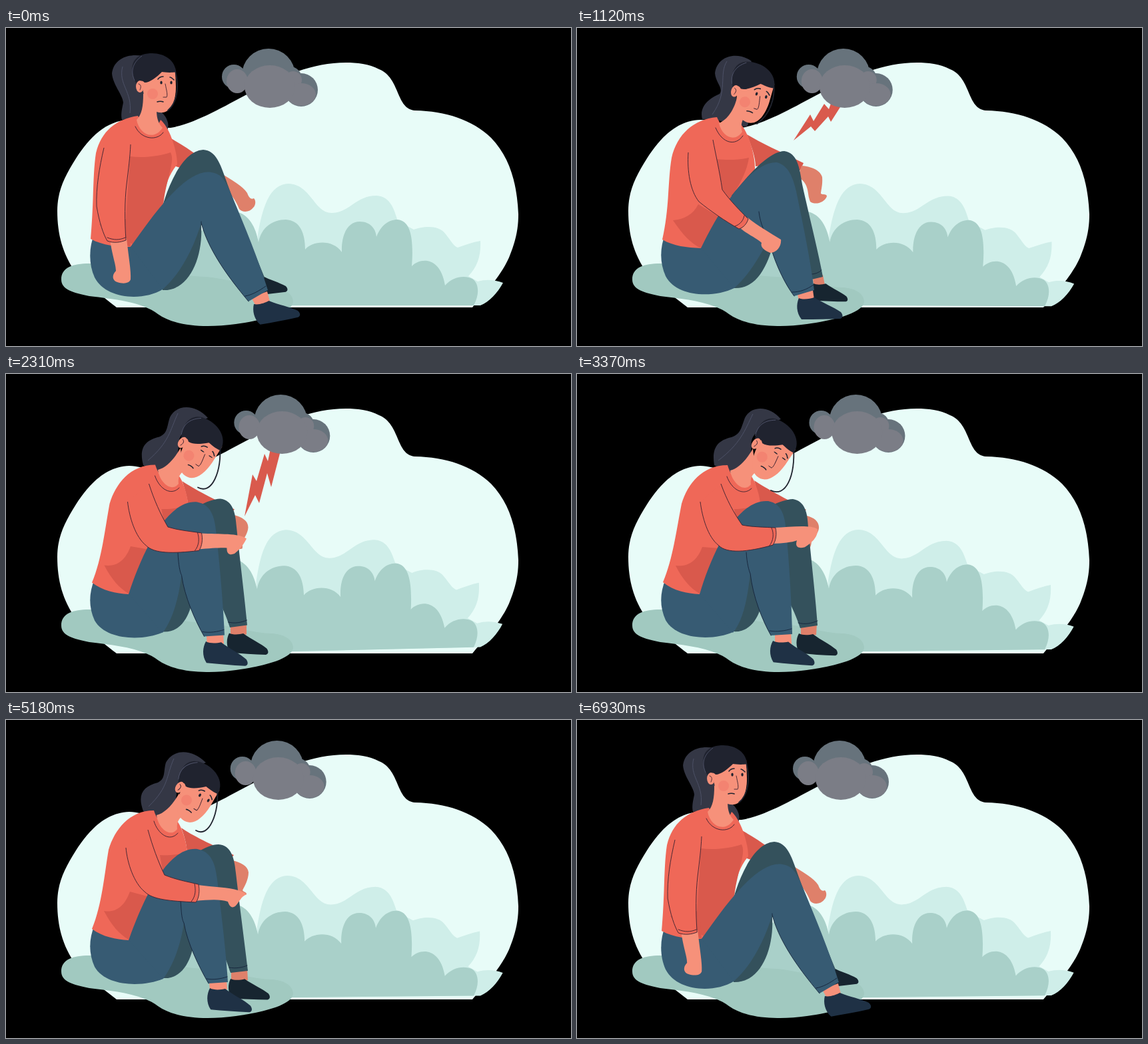
Recreate the animation shown at these times as an HTML page. Size 848 by 478 pixels, loop 6.96 s.

```html
<!DOCTYPE html>
<html lang="en">
<head>
<meta charset="utf-8">
<title>Under the cloud</title>
<style>
html, body { margin: 0; width: 100%; height: 100%; overflow: hidden; background: #000; }
svg { display: block; width: 100vw; height: 100vh; }
.line { fill: none; stroke: #3a2230; stroke-width: .9; stroke-linecap: round; }
.fold { fill: none; stroke: #16243a; stroke-width: .9; stroke-linecap: round; }
.strand { fill: none; stroke: #20242f; stroke-width: 1.8; stroke-linecap: round; }
.wisp { fill: none; stroke: #50546a; stroke-width: .9; }
.skin { fill: #f6917a; }
.skin-dark { fill: #df806a; }
.knit { fill: #ef6858; }
.knit-dark { fill: #d9594c; }
.jeans { fill: #375b73; }
.jeans-dark { fill: #34515c; }
.hair { fill: #20232f; }
</style>
</head>
<body>
<svg viewBox="0 0 848 478">
  <path fill="#e8fcf8" d="M166 420L700 420C716 400 740 378 755 345C766 318 769 300 769 280C767 235 757 195 728 165C700 138 660 125 614 124C585 122 592 75 560 62C545 54 527 52 510 52C460 52 415 72 365 98C325 119 283 144 247 150C225 150 210 139 185 138C150 139 125 165 105 196C88 223 77 245 77 275C77 310 85 340 105 368C122 385 140 400 166 420Z"/>
  <g id="bush">
    <path fill="#cfeee9" d="M378 310C385 270 395 235 424 234C458 235 462 278 489 278C515 278 525 252 556 252C578 253 583 275 588 290L612 303C625 298 650 295 660 310C668 320 672 328 678 330C690 326 700 322 712 320C713 342 708 358 694 373L708 381C722 377 735 379 746 383C738 398 725 412 712 417L378 417Z"/>
    <path fill="#a9d0c9" d="M255 417C255 330 310 275 345 276C365 280 375 300 379 322C383 300 400 288 420 288C441 289 449 308 449 333C460 320 490 317 504 337C503 312 512 291 531 291C547 291 555 302 556 314C562 298 573 288 588 288C608 290 612 318 609 358C622 345 652 343 659 387C670 374 688 371 700 377C710 384 711 400 702 417Z"/>
  </g>
  <path fill="#a1c9c0" d="M83 378C83 360 100 354 125 354C180 355 250 372 300 374C340 378 370 390 400 390C420 392 431 400 431 412C428 430 380 440 345 445C300 451 255 449 228 430C205 412 160 407 125 403C100 398 83 393 83 378Z"/>

  <path id="bolt" fill="#d95a4d"/>
  <g id="cloud">
    <g fill="#67737c">
      <circle cx="394" cy="71" r="40"/><circle cx="342" cy="73" r="18"/>
      <circle cx="426" cy="76" r="18"/><circle cx="443" cy="93" r="25"/>
    </g>
    <g fill="#7b7d86">
      <ellipse cx="347" cy="80" rx="16" ry="18"/>
      <circle cx="431" cy="78" r="13"/>
      <ellipse cx="443" cy="100" rx="22" ry="17"/>
      <ellipse cx="396" cy="88" rx="38" ry="32"/>
    </g>
  </g>

  <path id="pony" fill="#343745"/>
  <path id="ponyLine" class="wisp"/>
  <path id="farSleeve" class="knit-dark"/>
  <path id="farHand" class="skin-dark"/>
  <path id="farAnkle" class="skin-dark"/>
  <path id="farShoe" fill="#172530"/>
  <path id="seat" class="jeans"/>
  <path id="torso" class="knit"/>
  <path id="chestShade" class="knit-dark"/>
  <path id="sideShade" class="knit-dark"/>
  <path id="farLeg" class="jeans-dark"/>
  <path id="farCuff" class="fold"/>
  <path id="ankle" class="skin"/>
  <path id="shoe" fill="#1f3145"/>
  <path id="leg" class="jeans"/>
  <path id="kneeFold" class="fold"/>
  <path id="cuff" class="fold"/>
  <path id="neck" class="skin"/>
  <path id="collar" class="line"/>
  <g id="head"><g transform="translate(-228 -91)">
    <path class="skin" d="M203 76C205 100 212 124 230 127C247 129 255 112 255 88L254 60L215 58Z"/>
    <circle cx="220" cy="99" r="8" fill="#f27a6a" opacity=".6"/>
    <path class="hair" d="M196 84C186 66 186 46 205 40C230 33 254 45 255 66C245 68 238 66 234 66C226 74 216 82 208 82C204 78 200 78 196 84Z"/>
    <path class="wisp" d="M204 42C189 53 187 66 193 79"/>
    <ellipse class="skin" cx="201" cy="88" rx="6" ry="9"/>
    <path class="line" d="M199 84C203 85 203 89 201 93"/>
    <path class="line" d="M239 84C241 94 243 101 241 104L236 104"/>
    <path fill="none" stroke="#20232f" stroke-linecap="round" stroke-width="1.6" d="M228 77C230 74 233 73 236 73M246 74C248 74 250 76 252 78M227 111C229 110 234 110 236 111"/>
    <g fill="#20232f"><ellipse class="eye" cx="233" cy="82"/><ellipse class="eye" cx="248" cy="82"/></g>
  </g></g>
  <path id="strand" class="strand"/>
  <path id="hand" class="skin"/>
  <path id="sleeve" class="knit" stroke="#3a2230" stroke-width=".9"/>
  <path id="sleeveCuff" class="line"/>
</svg>
<script>
const LOOP = 6960, HALF = LOOP / 2;
const el = id => document.getElementById(id);

// Each part has four poses, from sitting upright to curled up.
const parts = {
  pony: [
    "M205 42C185 38 162 45 159 68C160 85 175 100 176 112C174 122 172 130 174 138Q210 132 241 156C248 145 240 130 228 122C215 100 205 80 205 42Z",
    "M262 50C240 34 210 42 207 68C208 82 220 90 214 99C198 106 183 118 188 137Q220 138 250 148C262 150 258 135 240 122C238 100 235 80 262 50Z",
    "M300 64C280 44 252 42 240 64C236 78 240 88 228 94C205 100 197 112 206 137Q225 150 246 150C252 135 256 118 256 108C256 95 262 80 300 64Z",
    "M306 68C290 48 262 46 252 66C246 82 246 90 232 95C210 100 202 112 206 137Q228 152 250 150C256 136 262 118 262 108C260 95 268 82 306 68Z"],
  ponyLine: [
    "M175 58C168 85 190 95 186 128", "M225 50C212 70 228 95 203 130",
    "M252 58C240 85 245 100 214 130", "M264 60C252 85 245 105 212 130"],
  farSleeve: [
    "M246 165C258 172 275 182 288 192L275 215C268 213 262 210 255 208C256 195 252 180 246 165Z",
    "M255 160C275 172 305 186 340 203L335 214C315 210 290 205 268 208C268 195 262 178 255 160Z",
    "M263 162C278 173 310 188 342 203L335 212C315 207 290 203 272 203C272 190 268 175 263 162Z",
    "M266 160C284 172 314 188 344 204L336 212C315 207 290 200 275 200C275 190 270 175 266 160Z"],
  farHand: [
    "M322 218C338 228 356 238 362 248C365 256 368 258 372 256C376 260 374 268 371 270C366 277 355 278 350 272C345 260 338 248 325 240Z",
    "M337 207C350 208 365 213 368 224C369 236 366 244 366 249C369 251 375 249 375 253C372 262 358 267 350 261C345 250 350 235 332 224Z",
    "M340 211C352 214 363 219 364 229C364 240 358 250 355 256C358 260 361 258 361 262C355 265 346 262 340 262C338 250 345 240 343 236Z",
    "M345 213C356 216 364 222 363 232C362 240 355 246 352 250C352 256 350 262 348 263C342 264 336 262 334 260C330 250 340 240 345 235Z"],
  farAnkle: [
    "M374 370L386 372L390 380L376 382Z", "M354 374L369 371L372 386L355 388Z",
    "M338 376L362 374L363 391L338 393Z", "M336 378L360 376L359 392L336 394Z"],
  farShoe: [
    "translate(365 375)rotate(-5)scale(.85)", "translate(355 384)rotate(3)scale(.8)",
    "translate(337 389)rotate(3)scale(.92)", "translate(333 390)rotate(5)scale(.92)"],
  seat: [
    "M133 308L187 320L240 340L235 393C205 411 150 408 133 375C124 355 124 330 133 308Z",
    "M133 308L186 320L240 340L236 391C205 406 150 405 133 373C124 353 124 330 133 308Z",
    "M133 308L184 320L240 340L236 389C205 402 150 401 133 371C124 351 124 330 133 308Z",
    "M133 308L184 320L240 340L234 388C205 401 150 400 133 370C124 350 124 330 133 308Z"],
  torso: [
    "M198 132C165 137 143 155 135 188C130 220 132 260 127 317C145 327 168 329 187 329L236 264C238 240 243 222 257 205C257 185 246 150 232 138C220 165 205 150 198 132Z",
    "M210 134C175 137 150 160 142 195C136 230 139 270 128 318C145 328 165 330 186 331L235 252C245 238 258 228 267 214C268 190 256 155 246 145C232 168 217 150 210 134Z",
    "M222 136C185 136 163 165 154 195C148 230 144 278 129 314C145 326 165 330 184 331L238 235C242 228 255 210 272 200C272 185 262 155 255 150C243 170 228 155 222 136Z",
    "M226 137C188 137 166 165 157 195C150 230 144 278 129 313C145 326 165 330 184 331L240 230C245 222 258 205 275 196C275 183 266 156 260 152C247 172 232 158 226 137Z"],
  chestShade: [
    "M186 193C208 196 232 192 247 187C254 200 242 222 236 264L190 325L178 318Z",
    "M209 197C228 199 242 198 258 195C256 210 248 230 233 252L228 258L214 245Z",
    "M231 203C245 204 255 202 270 200C265 208 255 218 245 230L240 240L236 232Z",
    "M236 203C248 203 258 201 272 198C266 206 258 215 250 222L245 228L240 225Z"],
  sideShade: [
    "M140 295C150 294 165 285 172 270L185 300L187 329C172 325 155 310 140 295Z",
    "M144 289C160 288 175 280 182 265L215 285L186 331C172 325 158 310 144 289Z",
    "M147 287C165 290 178 280 186 258L212 265L184 330C170 322 158 308 147 287Z",
    "M148 288C166 290 180 282 188 260L214 262L184 330C170 322 158 308 148 288Z"],
  farLeg: [
    "M236 264C245 235 265 185 296 183C315 184 322 205 330 228C345 270 370 330 388 375L372 390C340 350 310 310 293 296C296 345 275 396 235 394Z",
    "M232 252C250 230 285 186 311 185C331 188 334 210 338 235C350 290 362 335 369 374L352 378C340 345 320 310 300 300C292 345 275 393 236 391Z",
    "M238 240C255 220 295 187 319 187C338 188 343 208 345 230C352 290 358 335 363 377L337 380C328 350 305 300 284 300C286 345 272 390 236 388Z",
    "M240 230C258 215 300 189 324 188C342 191 346 208 347 230C352 285 358 335 361 378L335 382C325 350 300 300 281 310C282 345 270 390 234 387Z"],
  farCuff: [
    "M372 376C376 376 379 374 381 372", "M351 370C358 370 364 367 367 364",
    "M335 372C345 374 355 372 362 369", "M332 374C342 377 352 375 361 371"],
  ankle: [
    "M368 405L392 396L396 411L375 418Z", "M331 400L354 394L356 408L333 410Z",
    "M305 394L331 392L332 405L306 407Z", "M297 390L321 388L322 406L297 406Z"],
  shoe: [
    "translate(372 415)rotate(-10)scale(1)", "translate(333 406)rotate(0)scale(1)",
    "translate(306 403)rotate(5)scale(1)", "translate(294 401)rotate(6)scale(1)"],
  leg: [
    "M187 329C225 275 275 205 313 218C326 222 330 232 336 245C355 290 378 345 393 394L364 411C345 388 305 340 293 293C282 330 262 370 235 393Z",
    "M186 331C215 270 262 200 300 202C318 207 324 225 329 245C338 290 350 345 356 394L326 403C312 385 295 350 288 318C278 335 262 368 236 391Z",
    "M184 331C204 275 240 190 287 194C308 198 314 215 317 240C323 290 330 345 333 394L304 396C290 372 272 335 267 305C262 340 250 370 236 389Z",
    "M184 331C202 270 240 187 287 191C307 195 312 212 314 237C319 290 322 345 323 391L291 393C278 370 264 335 260 300C256 335 250 370 234 389Z"],
  kneeFold: [
    "M293 291C293 292 293 293 293 293C305 340 345 388 364 411", "M273 276C275 295 283 310 288 318C295 350 312 385 326 403",
    "M262 270C263 290 264 300 267 305C272 335 290 372 304 396", "M254 268C255 285 258 295 260 300C264 335 278 370 291 393"],
  cuff: [
    "M359 403C370 401 380 395 390 388", "M323 397C335 397 345 393 355 386",
    "M301 389C312 391 322 389 332 386", "M289 386C300 388 312 386 322 383"],
  neck: [
    "M206 98C206 118 204 130 196 138C200 160 222 170 235 150C227 142 226 132 226 122Z",
    "M240 105C236 122 226 138 213 143C218 165 238 172 248 156C245 148 247 140 252 132Z",
    "M260 110C250 128 238 140 226 143C228 162 246 178 257 164C256 156 258 150 264 145Z",
    "M264 112C254 130 242 142 230 145C232 162 250 180 261 166C260 158 262 152 268 148Z"],
  collar: [
    "M194 148C203 168 227 170 236 157", "M208 150C218 174 238 178 249 162",
    "M222 152C228 172 246 184 258 170", "M225 154C232 174 250 184 262 172"],
  head: [
    "translate(228 91)rotate(0)", "translate(262 106)rotate(18)",
    "translate(282 118)rotate(32)", "translate(289 123)rotate(36)"],
  strand: [
    "M254 64C260 90 257 112 243 124", "M295 82C298 105 290 130 270 144",
    "M317 102C320 140 305 178 285 166", "M325 108C328 155 313 186 291 175"],
  hand: [
    "M156 318C160 345 165 355 165 365C158 372 160 380 167 382C176 385 185 384 187 378C188 365 184 345 181 316Z",
    "M244 300C258 312 270 316 277 323C274 330 284 336 290 338C300 338 307 328 306 318C290 308 272 298 256 285Z",
    "M284 272C305 270 322 269 333 273C336 281 339 283 344 280C351 273 352 266 361 262C350 252 320 252 288 248Z",
    "M293 255C310 254 322 253 330 250C326 262 335 262 342 260C352 254 362 245 361 233C350 226 320 230 297 231Z"],
  sleeve: [
    "M147 180C140 210 135 240 136 268C140 292 146 310 152 320C162 324 172 322 180 319C178 290 178 260 181 235C184 210 186 195 187 175",
    "M167 187C165 215 170 245 183 261C200 275 222 290 243 302C250 300 255 294 257 287C245 275 230 260 218 243C214 215 208 190 204 168",
    "M180 192C182 215 192 245 208 258C220 270 245 272 285 274C290 268 291 255 289 247C272 243 255 240 238 233C228 212 220 190 213 165",
    "M185 192C188 215 196 245 213 258C225 270 255 268 294 257C299 250 300 240 298 231C282 230 262 230 248 227C235 208 225 190 216 165"],
  sleeveCuff: [
    "M152 315C162 319 170 319 179 315", "M237 298C246 295 250 288 251 282",
    "M278 273C285 265 285 255 283 246", "M289 258C295 250 296 240 292 231"]
};

const boltShapes = [
  "M325 169L350 130L355 140L371 114L378 122L383 108L402 108L381 141L377 133L357 155L351 148Z",
  "M358 214L370 151L376 161L388 120L393 131L398 108L414 108L398 170L392 149L380 194L374 182Z"];

// Knots of [time, value].
const curling = [[0, 0], [820, .76], [1120, 1], [1780, 2], [2310, 2.5], [HALF, 3]];
const swaying = [[0, 0], [1120, .25], [2310, -1.3], [3370, -.6], [LOOP, -.6]];

const clamp = v => Math.min(1, Math.max(0, v));
const ramp = (a, b, t) => { const k = clamp((t - a) / (b - a)); return k * k * (3 - 2 * k); };
const number = /-?(\d+\.?\d*|\.\d+)/g;

// Blends the numbers of two strings with the same layout.
function mix(a, b, k) {
  const ends = b.match(number);
  let i = 0;
  return a.replace(number, n => (+n + (ends[i++] - n) * k).toFixed(2));
}

// Smooth curve through the knots, at rest on both ends.
function curve(knots, t) {
  const slope = i => i && i < knots.length - 1
    ? (knots[i + 1][1] - knots[i - 1][1]) / (knots[i + 1][0] - knots[i - 1][0]) : 0;
  let i = 0;
  while (i < knots.length - 2 && t > knots[i + 1][0]) i++;
  const [t0, v0] = knots[i], [t1, v1] = knots[i + 1];
  const h = t1 - t0, k = (t - t0) / h, r = 1 - k;
  return v0 * (1 + 2 * k) * r * r + slope(i) * h * k * r * r
    + v1 * k * k * (3 - 2 * k) - slope(i + 1) * h * k * k * r;
}

const shoePath = "M0 0C7 3 17 1 23 -1C37 8 52 13 63 21C67 26 66 30 62 31C42 32 22 32 4 32C-4 22 -4 9 0 0Z";
for (const id of ["shoe", "farShoe"]) el(id).setAttribute("d", shoePath);

const movers = Object.entries(parts).map(([id, poses]) =>
  ({ node: el(id), attr: poses[0][0] === "M" ? "d" : "transform", poses }));
const eyes = document.querySelectorAll(".eye");

function draw(t) {
  const pose = curve(curling, Math.min(t, LOOP - t));
  const i = Math.min(2, Math.floor(pose));
  for (const { node, attr, poses } of movers)
    node.setAttribute(attr, mix(poses[i], poses[i + 1], pose - i));

  const shut = ramp(2.1, 2.4, pose);
  for (const eye of eyes) {
    eye.setAttribute("rx", 1.7 + 1.6 * shut);
    eye.setAttribute("ry", 2.6 - 1.9 * shut);
  }

  const drift = 12.25 * (1 - Math.cos(2 * Math.PI * t / LOOP));
  el("cloud").setAttribute("transform", `translate(${drift} 0)`);
  el("bush").setAttribute("transform", `rotate(${curve(swaying, t)} 430 417)`);

  const size = ramp(600, 1000, t) * (1 - ramp(2450, 2850, t));
  const x = 394 + drift;
  el("bolt").setAttribute("d", mix(...boltShapes, clamp((t - 1120) / 1190)));
  el("bolt").setAttribute("transform", `translate(${x} 100)scale(${size})translate(${-x} -100)`);
}

const start = performance.now();
function tick() {
  draw((performance.now() - start) % LOOP);
  requestAnimationFrame(tick);
}
tick();
</script>
</body>
</html>
```
